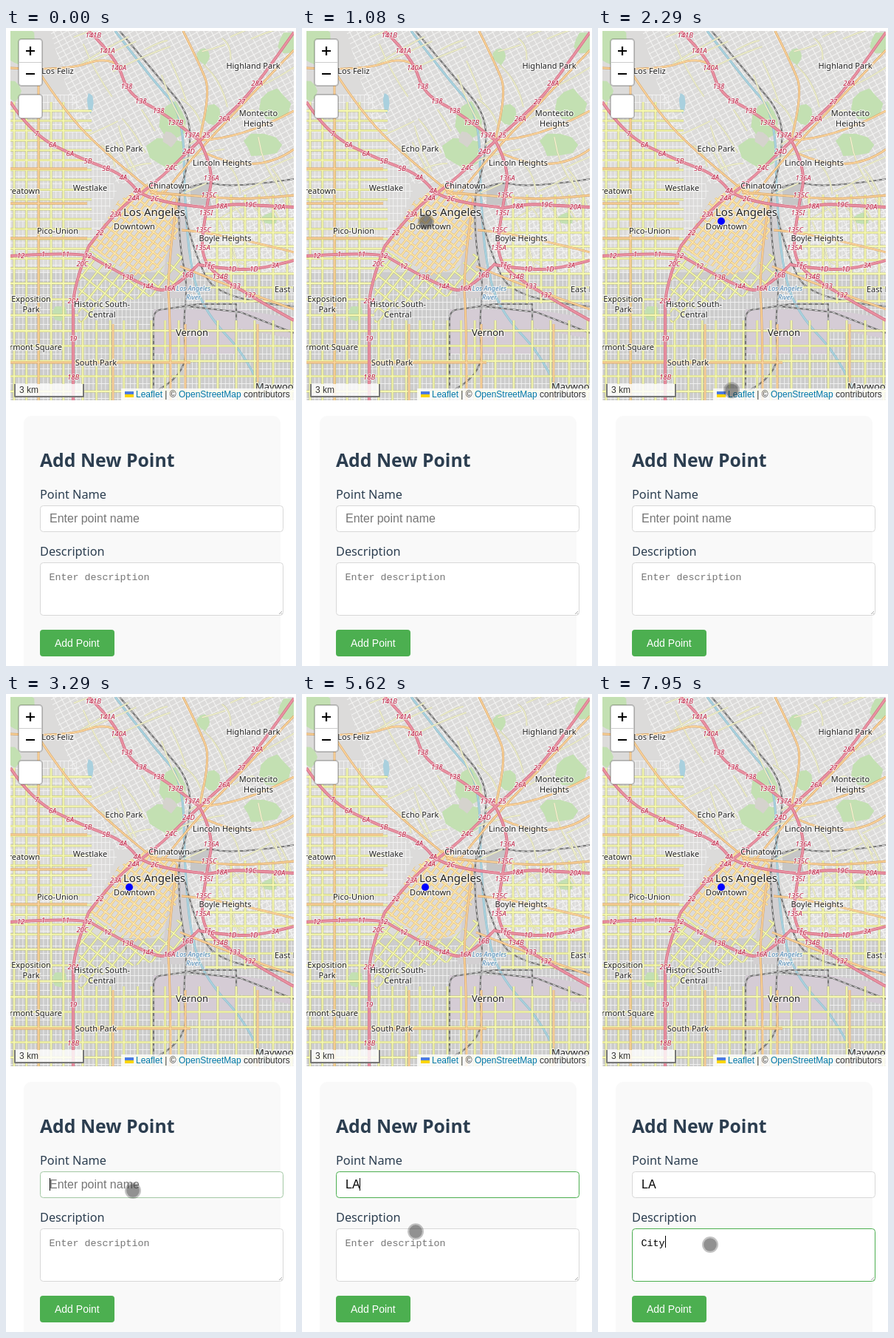
An HTML page that plays this animation: 393 px wide and 862 px high, repeating every 8 s.

```html
<!DOCTYPE html>
<html lang="en">
<head>
<meta charset="utf-8">
<title>Add New Point</title>
<style>
html, body { margin: 0; width: 100%; height: 100%; overflow: hidden; background: #fff; }
svg { display: block; width: 393px; height: 862px; }
path { fill: none; stroke-linejoin: round; }
.arial { font-family: "Liberation Sans", Arial, sans-serif; }
.ui { font-family: "Noto Sans", "Open Sans", sans-serif; fill: #2c3e50; }
.mono { font: 13.333px "Liberation Mono", monospace; white-space: pre; }
.hint { fill: #757575; }
.place { font: 11px "Noto Sans", sans-serif; fill: #222; stroke: #fff; stroke-opacity: .65; stroke-width: 2.4; paint-order: stroke; text-anchor: middle; }
.exit { font: italic 9.5px "Noto Sans", sans-serif; fill: #bd1e42; stroke: #fff; stroke-opacity: .6; stroke-width: 2; paint-order: stroke; text-anchor: middle; }
</style>
</head>
<body>
<svg viewBox="0 0 393 862" xmlns="http://www.w3.org/2000/svg">
  <defs>
    <clipPath id="frame"><rect x="6" y="4" width="384" height="499"/></clipPath>
    <clipPath id="core"><path d="M113 296L152 234L192 210L232 228L233 280L206 325L176 335Z"/></clipPath>
    <clipPath id="southCore"><path d="M99 335L113 300L176 335L206 328L238 300L240 340L200 362L142 372L98 400Z"/></clipPath>
    <clipPath id="hills"><path d="M60 4H390V330H268L240 215L190 205L140 185L95 130Z"/></clipPath>
    <pattern id="blocks" width="5.6" height="10" patternUnits="userSpaceOnUse"><path d="M0 .5H6M.5 0V10" stroke="#f2f2f2" stroke-width=".9"/></pattern>
    <pattern id="slant" width="9" height="7" patternUnits="userSpaceOnUse" patternTransform="rotate(-28)"><path d="M0 .5H9M.5 0V7" stroke="#f6f6f5" stroke-width=".9"/></pattern>
  </defs>

  <g id="map" clip-path="url(#frame)"></g>

  <g fill="#fff" stroke="#000" stroke-opacity=".22" stroke-width="2">
    <rect x="17" y="15" width="32" height="63" rx="4"/>
    <rect x="17" y="90" width="32" height="32" rx="4"/>
  </g>
  <path d="M18 46.5H48" stroke="#ccc"/>
  <path d="M27 31H39M33 25V37M27 62H39" stroke="#000" stroke-width="2.2"/>
  <rect x="12" y="481" width="93" height="16" fill="#fff" fill-opacity=".8"/>
  <path d="M12 481V498H105V481" stroke="#777" stroke-width="2"/>
  <text class="arial" x="18" y="493" font-size="12" fill="#333">3 km</text>
  <rect x="156" y="487" width="234" height="16" fill="#fff" fill-opacity=".8"/>
  <rect x="161" y="491" width="12" height="4" fill="#4c7be1"/>
  <rect x="161" y="495" width="12" height="4" fill="#ffd500"/>
  <text class="arial" x="176" y="499" font-size="12" fill="#333"><tspan fill="#0078a8">Leaflet</tspan> | © <tspan fill="#0078a8">OpenStreetMap</tspan> contributors</text>

  <circle id="marker" cx="167" cy="261" r="5" fill="#00f"/>

  <rect x="24" y="524" width="348" height="360" rx="10" fill="#f9f9f9"/>
  <text class="ui" x="46" y="593" font-size="24.8" font-weight="700">Add New Point</text>
  <text class="ui" x="46" y="636" font-size="16.3">Point Name</text>
  <text class="ui" x="46" y="713" font-size="16.3">Description</text>
  <rect id="nameBox" x="46.5" y="645.5" width="329" height="35" rx="4" fill="#fff"/>
  <text id="name" class="arial" x="59" y="668" font-size="16"></text>
  <rect id="descBox" x="46.5" y="722.5" width="329" height="71" rx="4" fill="#fff"/>
  <path d="M370 792L374 788M372.5 792L374 790.5" stroke="#999" stroke-width=".8"/>
  <text id="desc" class="mono" x="58.5" y="746"></text>
  <rect id="caret" width="1" fill="#000"/>
  <rect x="46" y="813" width="101" height="36" rx="4" fill="#4caf50"/>
  <text class="arial" x="66" y="836" font-size="14" fill="#fff">Add Point</text>

  <g id="pointer">
    <circle r="11" fill="#282828" fill-opacity=".28"/>
    <circle r="8.8" fill="#323232" fill-opacity=".34"/>
  </g>
</svg>
<script>
const $ = id => document.getElementById(id);
const PERIOD = 8000;

let seed = 11;
const rnd = () => (seed = seed * 16807 % 2147483647) / 2147483647;
const spread = k => (rnd() - .5) * k;
const range = (a, b, step) => Array.from({length: Math.ceil((b - a) / step)}, (_, i) => a + i * step);

// Smooth curve through "x,y x,y ..." by way of segment midpoints
function curve(str) {
  const p = str.split(' ').map(s => s.split(',').map(Number));
  let d = 'M' + p[0];
  for (let i = 1; i < p.length - 1; i++) {
    const end = i === p.length - 2 ? p[i + 1] : [(p[i][0] + p[i + 1][0]) / 2, (p[i][1] + p[i + 1][1]) / 2];
    d += 'Q' + p[i] + ' ' + end;
  }
  return d;
}
const curves = (...list) => list.map(curve).join('');
const stroke = (d, color, width, more = '') => `<path d="${d}" stroke="${color}" stroke-width="${width}" ${more}/>`;
const cased = (d, [edge, fill], width) => stroke(d, edge, width) + stroke(d, fill, width - 1.2);
const area = (d, fill) => `<path d="${d}" style="fill:${fill}"/>`;
const vert = (xs, a, b) => xs.map(x => `M${x} ${a}V${b}`).join('');
const horiz = (ys, a, b) => ys.map(y => `M${a} ${y}H${b}`).join('');
const text = (cls, s, x, y, more = '') => `<text class="${cls}" x="${x}" y="${y}" style="${more}">${s}</text>`;

const YELLOW = ['#c3c67c', '#f6f8b0'], ORANGE = ['#d9a05c', '#fbd6a0'], PINK = ['#d2607a', '#e892a2'];

function land() {
  return area('M6 4H390V503H6Z', '#dcdbda')
    + area('M6 330H390V503H6Z', '#cccccc')
    + area('M60 4H390V330H262L240 210L150 210L95 125Z', 'url(#slant)')
    + area('M6 90H95L150 220L100 340H240L265 250H390V503H6Z', 'url(#blocks)')
    + area('M225 235L240 230L252 350L240 365H210Z', '#d3d0d2')
    + area('M250 215L275 210L278 240L250 238Z', '#c6c6c6')
    + area('M200 380H312L390 392V420L312 405V440H200Z', '#d5ccd5');
}

function blob(x, y, w, h, color = '#c3e0b2') {
  const points = range(0, 9, 1).map(i => {
    const a = i * Math.PI * 2 / 9, k = .8 + rnd() * .4;
    return [x + w * k * Math.cos(a), y + h * k * Math.sin(a)];
  });
  return area('M' + points.join('L') + 'Z', color);
}

function parks() {
  return blob(20, 25, 24, 30) + blob(10, 85, 12, 14) + blob(226, 125, 20, 24) + blob(218, 168, 26, 22)
    + blob(222, 150, 9, 10, '#d5d3cd') + blob(364, 102, 20, 20) + blob(346, 158, 24, 15) + blob(384, 20, 14, 14)
    + blob(268, 38, 10, 11) + blob(280, 118, 11, 13) + blob(72, 385, 10, 10) + blob(357, 258, 10, 8)
    + blob(114, 102, 4, 14, '#a9d0de');
}

function water() {
  const river = curve('148,4 200,72 240,115 242,232 250,325 270,385 330,448 352,503');
  return stroke(river, '#8cbccb', 3) + stroke(river, '#acd3df', 1.8);
}

function rails() {
  const d = curves('154,4 208,68 252,120 246,190 233,225 236,300 246,345 240,400 246,470 200,492',
    '236,222 262,206 310,216 390,204', '242,250 256,310 290,368 390,376')
    + 'M200 503V392Q201 380 214 380L262 373L312 373V503M246 376L318 384L390 412';
  return stroke(d, '#747474', 2.2) + stroke(d, '#e6e6e6', 1, 'stroke-dasharray="4 4"');
}

function streets() {
  let lanes = '';
  for (let i = 0; i < 46; i++) {
    const x = 70 + rnd() * 300, y = 10 + rnd() * 290, a = (rnd() < .5 ? -.55 : .95) + rnd() * .3, n = 30 + rnd() * 55;
    const dx = n * Math.cos(a), dy = n * Math.sin(a), bend = spread(24);
    lanes += `M${x} ${y}q${dx / 2 + bend} ${dy / 2 - bend} ${dx} ${dy}`;
  }
  const grid = vert(range(11, 90, 16.7), 100, 503) + horiz(range(112, 330, 13.3), 6, 116)
    + vert(range(104, 250, 18.6), 395, 503) + vert(range(262, 390, 25), 395, 503)
    + horiz(range(345, 410, 21.5), 6, 98) + horiz(range(409, 503, 20.5), 6, 390)
    + vert(range(286, 390, 19), 225, 372) + horiz(range(258, 370, 18.5), 270, 390);
  return `<g clip-path="url(#hills)">${cased(lanes, ['#cfcfb0', '#fbfbd2'], 2.2)}</g>` + cased(grid, YELLOW, 3);
}

// Street grid turned to the downtown axis
function turnedGrid(clip, dx, dy, colors, width) {
  return `<g clip-path="url(#${clip})"><g transform="translate(170 275) rotate(38)">`
    + cased(vert(range(-120, 150, dx), -150, 160) + horiz(range(-150, 160, dy), -150, 150), colors, width) + '</g></g>';
}

function primaries() {
  const d = curves('6,54 80,58 138,38 155,52', '40,52 82,118 152,184 205,226', '195,222 270,228 330,232 390,226',
    '238,273 290,277 390,303', '236,322 310,352 390,380', '215,222 255,172 320,104 390,30',
    '240,4 262,48 278,88 262,150', '260,152 320,150 390,112', '272,170 340,200 390,164', '232,230 218,330 223,400 223,503')
    + vert([44], 52, 503) + horiz(range(190, 300, 47), 6, 110) + horiz([452], 6, 250) + vert(range(145, 390, 98), 400, 503);
  return cased(d, ORANGE, 2.8);
}

// Each motorway: its course, its exits, and the stretch over which they are spaced
const motorways = [
  ['112,4 150,40 165,90 215,115 262,152', '141B 141A 140A 138 138 138 137B 137A', .04, .94],
  ['262,152 282,190 272,240 262,312 300,345 390,395', '136A 135C 135I 135C 135A 1A 134B 133 132', .17, .78],
  ['390,6 345,70 310,110 262,152 200,212 150,245 112,295', '28A 27 26A 25 24D 24C 3B 24A 23A 22', .21, .94],
  ['112,295 91,350 91,400 91,503', '20C 20A 19 18B', .12, .85],
  ['6,100 36,145 105,178 160,198 190,235 268,242', '7 6A 6A 5B 5B 4A 4A 2C', .18, .78],
  ['6,308 104,302 130,318 195,352 225,356 262,318', '12 1 11 12 12 13B 14A 16A 16B', .05, .92],
  ['268,244 304,237 345,240 390,242', '18A 19C 20A', .2, .84],
  ['262,320 300,326 345,326 390,314', '1C 1D 1D 3A', .12, .8]
];

function exits([course, names, from, to]) {
  const line = document.createElementNS('http://www.w3.org/2000/svg', 'path');
  line.setAttribute('d', curve(course));
  const list = names.split(' '), size = line.getTotalLength();
  return list.map((name, i) => {
    const p = line.getPointAtLength(size * (from + (to - from) * i / (list.length - 1)));
    return text('exit', name, p.x, p.y + 3.5);
  }).join('');
}

const places = `Los Feliz|70|62,Highland Park|335|55,Montecito|342|119,Heights|342|133,Echo Park|160|167,Lincoln Heights|293|186,Chinatown|221|217
Westlake|114|220,Downtown|174|272,Pico-Union|70|278,Boyle Heights|297|288,Exposition|34|370,Park|34|384,Historic South-|130|377,Central|130|391,South Park|122|456`;

function labels() {
  return motorways.map(exits).join('')
    + places.split(/[,\n]/).map(p => text('place', ...p.split('|'))).join('')
    + text('place', 'Koreatown', 46, 224, 'text-anchor:end') + text('place', 'Vermont Square', 76, 435, 'text-anchor:end')
    + text('place', 'East Los Angeles', 364, 357, 'text-anchor:start')
    + text('place', 'Maywood', 338, 489, 'text-anchor:start;font-size:13px') + text('place', 'Vernon', 252, 416, 'font-size:13px')
    + text('place', 'Los Angeles', 201, 254, 'font-size:15px')
    + ['Los Angeles', 'River'].map((s, i) => text('place', s, 254, 355 + i * 12, 'font-size:9px;font-style:italic;fill:#4786b5')).join('');
}

$('map').innerHTML = land() + parks() + water() + rails() + streets()
  + turnedGrid('southCore', 13, 17, YELLOW, 2.8)
  + turnedGrid('core', 8, 11, ['#e6bd70', '#fbe6ac'], 2.8)
  + primaries() + cased(curves(...motorways.map(m => m[0])), PINK, 3.8) + labels();

// Pointer moves: time span, end points, sideways bow
const moves = [
  {t: [280, 1080], from: [358, 679], to: [168, 262], bow: -50},
  {t: [2290, 2760], from: [181, 489], to: [172, 671], bow: 20},
  {t: [5420, 5750], from: [172, 671], to: [152, 744], bow: -3}
];
const presses = [1340, 3090, 5950];

const ramp = (t, a, b) => Math.min(1, Math.max(0, (t - a) / (b - a)));
const mix = (a, b, u) => a + (b - a) * u;
const typed = (t, word, times) => word.slice(0, times.filter(s => t >= s).length);
const border = u => `rgb(${[76, 175, 80].map(c => Math.round(mix(216, c, u)))})`;

function pointerAt(t) {
  const {t: span, from, to, bow} = moves.filter(m => t >= m.t[0]).pop();
  const u = ramp(t, ...span), e = 1 - (1 - u) ** 1.5;
  return [mix(from[0], to[0], e) + bow * Math.sin(Math.PI * u), mix(from[1], to[1], e)];
}

function fill(el, value, hint) {
  el.textContent = value || hint;
  el.classList.toggle('hint', !value);
}

function draw(t) {
  const name = typed(t, 'LA', [4690, 5220]);
  const desc = typed(t, 'City', [7160, 7560, 7890, 7950]);
  fill($('name'), name, 'Enter point name');
  fill($('desc'), desc, 'Enter description');
  $('nameBox').setAttribute('stroke', border(ramp(t, 3200, 3440) - ramp(t, 6150, 6340)));
  $('descBox').setAttribute('stroke', border(ramp(t, 6130, 6320)));
  $('marker').style.display = t >= 1540 ? '' : 'none';

  const inName = t >= 3290 && t < 3830 || t >= 4290 && t < 5750;
  const inDesc = t >= 6150 && t < 6690 || t >= 7160;
  const caret = $('caret');
  caret.style.display = inName || inDesc ? '' : 'none';
  caret.setAttribute('x', 59 + (inDesc ? 8 * desc.length : 9.5 * name.length));
  caret.setAttribute('y', inDesc ? 732 : 654);
  caret.setAttribute('height', inDesc ? 16 : 17);

  const pointer = $('pointer');
  pointer.style.display = t >= 280 ? '' : 'none';
  if (t >= 280) {
    const size = presses.some(p => t >= p && t < p + 200) ? 15 / 11 : 1;
    pointer.setAttribute('transform', `translate(${pointerAt(t)}) scale(${size})`);
  }
}

const start = performance.now();
function tick() {
  draw((performance.now() - start) % PERIOD);
  requestAnimationFrame(tick);
}
tick();
</script>
</body>
</html>
```
